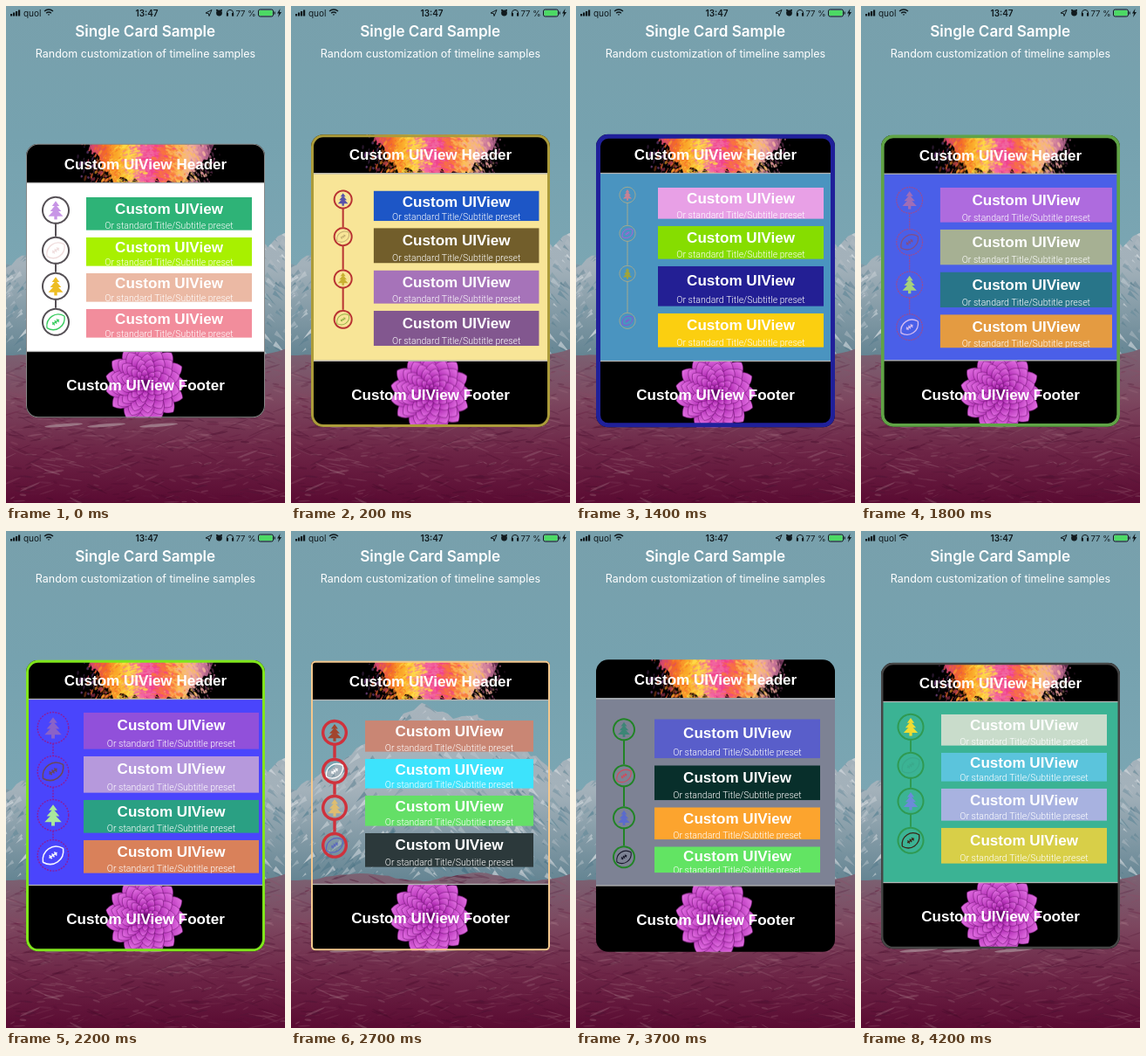
An HTML page with a canvas for the animation above (4.3 s loop, 320 by 569 pixels).

```html
<!DOCTYPE html>
<html lang="en">
<head>
<meta charset="utf-8">
<title>Single Card Sample</title>
<style>
html, body { margin: 0; width: 100%; height: 100%; overflow: hidden; background: #78a1ae; }
canvas { display: block; }
</style>
</head>
<body>
<canvas id="stage" width="320" height="569"></canvas>
<script>
const W = 320, H = 569, LOOP = 4300, TAU = Math.PI * 2;
const CARD = { x: 23, w: 274, head: 44, foot: 75.5, middle: 314.6, gap: 8 };
const UI = 'Inter, Roboto, sans-serif';
const BOLD = 'bold 17.07px "Liberation Sans", Arial, sans-serif';
const LIGHT = '300 10.55px Roboto, "Liberation Sans", sans-serif';
const ctx = document.getElementById('stage').getContext('2d');

let seed = 7;
const rnd = (a = 0, b = 1) => {
  seed = (seed * 16807) % 2147483647;
  return a + (b - a) * seed / 2147483647;
};
const pick = list => list[Math.floor(rnd(0, list.length))];

function layer(w, h, draw) {
  const c = document.createElement('canvas');
  c.width = w;
  c.height = h;
  draw(c.getContext('2d'));
  return c;
}

function stops(fill, ...colors) {
  colors.forEach((c, i) => fill.addColorStop(i / (colors.length - 1), c));
  return fill;
}

function poly(g, ...pts) {
  g.beginPath();
  for (const [x, y] of pts) g.lineTo(x, y);
  g.closePath();
}

function text(g, str, x, y, font, color = '#fff', align = 'center') {
  g.font = font;
  g.fillStyle = color;
  g.textAlign = align;
  g.fillText(str, x, y);
}

function statusBar(g) {
  const ink = '#10191d';
  g.fillStyle = g.strokeStyle = ink;
  for (let i = 0; i < 4; i++) g.fillRect(5 + i * 3, 9 - i * 1.5, 2.2, 2.5 + i * 1.5);
  g.lineWidth = 1.5;
  for (const r of [1, 4, 7]) {
    g.beginPath();
    g.arc(49, 11, r, -Math.PI * .75, -Math.PI * .25);
    g.stroke();
  }
  text(g, 'quol', 20, 11.5, '10px ' + UI, ink, 'left');
  text(g, '13:47', 161.5, 11.5, '600 10px ' + UI, ink);
  text(g, '77 %', 286.5, 11.5, '9.5px ' + UI, ink, 'right');
  g.lineWidth = 1;
  poly(g, [229, 8], [236, 4.5], [233, 11.5], [232.3, 8.6]);
  g.stroke();
  g.beginPath();
  g.arc(244.5, 8, 3.4, 0, TAU);
  g.fill();
  g.beginPath();
  g.arc(257, 8, 3.6, Math.PI, 0);
  g.stroke();
  for (const x of [241, 246]) g.fillRect(x, 4, 2, 1.5);
  for (const x of [252.8, 259]) g.fillRect(x, 8, 2.2, 3.6);
  g.beginPath();
  g.roundRect(289.5, 4, 17, 8, 2);
  g.stroke();
  g.fillRect(307.5, 6.5, 1.2, 3);
  g.fillStyle = '#4cd964';
  g.fillRect(290.5, 5, 15, 6);
  g.fillStyle = ink;
  poly(g, [314.5, 3], [311, 8.5], [313, 8.5], [312, 13], [316, 7], [313.8, 7]);
  g.fill();
}

// Rough line through a few key points
function ridge(keys, step, jitter) {
  const pts = [];
  keys.slice(1).forEach(([x1, y1], i) => {
    const [x0, y0] = keys[i];
    for (let x = x0; x < x1; x += step) {
      pts.push([x, y0 + (y1 - y0) * (x - x0) / (x1 - x0) + rnd(-jitter, jitter)]);
    }
  });
  return [...pts, keys.at(-1)];
}

const backdrop = layer(W, H, g => {
  g.fillStyle = stops(g.createLinearGradient(0, 0, 0, 300), '#78a0ac', '#76a2af', '#7ba6b3');
  g.fillRect(0, 0, W, H);

  g.save();
  poly(g, ...ridge([[0, 298], [45, 272], [150, 196], [190, 215], [215, 211], [300, 274], [320, 260]], 6, 3),
    [W, 410], [0, 410]);
  g.fillStyle = stops(g.createLinearGradient(0, 195, 0, 400), '#a7b3bc', '#a3b1ba', '#658593');
  g.fill();
  g.clip();
  for (let i = 0; i < 850; i++) {
    const x = rnd(-10, 330), y = rnd(195, 392), s = rnd(2, 11), lean = x < 155 ? -s : s;
    g.globalAlpha = rnd(.25, .65);
    g.fillStyle = pick(['#dfe3e6', '#c8cfd5', '#aeb9c1', '#4a7385', '#5f8797']);
    poly(g, [x, y], [x + lean, y + s * 1.3], [x + lean * .3, y + s * .8], [x - lean * .3, y + s * .5]);
    g.fill();
  }
  g.restore();

  g.save();
  const edge = Array.from({ length: 41 }, (_, i) => [i * 8, 396 + 4 * Math.sin(i * .38 + 1) + rnd(-1.5, 1.5)]);
  poly(g, ...edge, [W, H], [0, H]);
  g.fillStyle = stops(g.createLinearGradient(0, 390, 0, H), '#7b6474', '#7d4860', '#6d2546', '#5a0b32');
  g.fill();
  g.clip();
  for (let i = 0; i < 900; i++) {
    g.globalAlpha = rnd(.12, .4);
    g.fillStyle = pick(['#a0707f', '#8b4d65', '#4f1535', '#611a3d', '#420a28']);
    g.beginPath();
    g.ellipse(rnd(0, W), rnd(395, H), rnd(2, 14), rnd(.4, 1.3), rnd(-.5, .5), 0, TAU);
    g.fill();
  }
  g.globalAlpha = .7;
  g.fillStyle = '#ab919b';
  for (const x of [66, 115, 175]) {
    g.beginPath();
    g.ellipse(x, 480, 22, 1.8, -.08, 0, TAU);
    g.fill();
  }
  g.restore();

  statusBar(g);
  text(g, 'Single Card Sample', 159.7, 35, '600 17.1px ' + UI);
  text(g, 'Random customization of timeline samples', 160, 58.5, '12.5px ' + UI);
});

// Burst of coloured powder
const header = layer(CARD.w, CARD.head, g => {
  g.fillRect(0, 0, CARD.w, CARD.head);
  const dust = ['#6c3f78', '#d8486c', '#f46a2a', '#fba92a', '#ffdc48', '#f26aa4', '#f2428c',
    '#f9763e', '#fcc058', '#f3b09c', '#c9759a', '#5c2a4a'];
  const last = dust.length - 1;
  g.fillStyle = stops(g.createLinearGradient(62, 0, 218, 0), ...dust);
  poly(g, ...ridge([[72, 0], [100, 40], [135, 44], [180, 42], [212, 10], [216, 0]], 4, 5));
  g.fill();
  for (let i = 0; i < 1400; i++) {
    const u = (rnd() + rnd()) / 2, band = Math.round(u * last + rnd(-1.1, 1.1));
    g.globalAlpha = rnd(.35, .9);
    g.fillStyle = dust[Math.max(0, Math.min(last, band))];
    g.beginPath();
    g.ellipse(58 + u * 165, rnd(-2, 46), rnd(.5, 3.6), rnd(.4, 1.6), (.5 - u) * -3, 0, TAU);
    g.fill();
  }
});

// Dahlia
const footer = layer(CARD.w, 76, g => {
  g.fillRect(0, 0, CARD.w, 76);
  g.translate(137, 36);
  g.strokeStyle = 'rgba(95, 8, 100, .55)';
  g.lineWidth = .8;
  for (let ring = 0; ring < 7; ring++) {
    const r = 46 - ring * 6, n = 15 - ring, half = r * .3;
    g.fillStyle = stops(g.createRadialGradient(0, 0, r * .3, 0, 0, r), '#6c0f70', '#b32fb6', '#e472e4');
    for (let i = 0; i < n; i++) {
      g.save();
      g.rotate((i + ring * .5 + rnd(-.12, .12)) / n * TAU);
      g.beginPath();
      g.moveTo(0, 0);
      g.bezierCurveTo(r * .5, -half, r * .85, -half, r, 0);
      g.bezierCurveTo(r * .85, half, r * .5, half, 0, 0);
      g.fill();
      g.stroke();
      g.restore();
    }
  }
});

// Moments of change; each style is reached at its own step
const changes = [0, 100, 200, 700, 900, 1100, 1200, 1400, 1700, 1800, 2200, 2600, 2700, 3200, 3700, 4200];

// x: left edge of the cells, pad: space above and below them, r: circle radius
const styles = [
  { step: 0, x: 92, pad: [17, 16], heights: [38, 33, 33, 33], r: 16, border: 1,
    edge: '#888888', body: '#ffffff', stroke: '#555055',
    cells: ['#2eb377', '#a8f000', '#ebb9a4', '#f28d9c'], icons: ['#c795e6', '#f0dddd', '#edbd22', '#38cc5e'] },
  { step: 3, x: 96, pad: [22, 18], heights: [33, 44, 41, 44], r: 8.5, border: 4,
    edge: '#bda513', body: '#f5d863', stroke: '#ea2420',
    cells: ['#1428ee', '#571540', '#8450c4', '#4a3c88'], icons: ['#22328c', '#ad9638', '#b6aa38', '#c7a63c'] },
  { step: 7, x: 94, pad: [17, 16], heights: [36, 38, 46, 39], r: 9.5, border: 5, line: 1,
    edge: '#20209a', body: '#4a94c0', stroke: '#a9ab8c',
    cells: ['#e8a0e6', '#86dd00', '#231f94', '#fbcf10'], icons: ['#c88294', '#b759da', '#a0a43a', '#9548d4'] },
  { step: 10, x: 89, pad: [16, 14], heights: [42, 42, 38, 38], r: 18.5, border: 3, line: 1.4, dots: 1.3, width: 201,
    edge: '#80e51c', body: '#4a45fc', stroke: '#8b1c9c',
    cells: ['#9150da', '#b699dc', '#2aa083', '#d9815a'], icons: ['#8a62c8', '#6a4856', '#a9e89c', '#f6f6ff'] },
  { step: 12, x: 85, pad: [24, 20], heights: [36, 34, 35, 39], r: 15, border: 2, line: 3.4, width: 193, radius: 5,
    edge: '#f4c88e', body: '#9aa4aa00', stroke: '#cf323c',
    cells: ['#c98674', '#3de3fc', '#64df67', '#2c393b'], icons: ['#a2452e', '#ffffff', '#dfbd70', '#5c69be'] },
  { step: 14, x: 90, pad: [24, 15], heights: [45, 40, 37, 30], r: 13, border: 0,
    edge: '#7d829400', body: '#7d8294', stroke: '#218426',
    cells: ['#595eca', '#082f2b', '#fca42e', '#62e463'], icons: ['#3c8676', '#d24a5c', '#5b6bcd', '#18192b'] },
  { step: 15, x: 92, pad: [15, 22], heights: [36, 33, 37, 41], r: 15.5, border: 2.5,
    edge: '#454545', body: '#3bb394', stroke: '#2f9a52',
    cells: ['#c9dccb', '#5bc4dc', '#a8b2e0', '#d8cf48'], icons: ['#f0dc32', '#3aa98c', '#6c8bd8', '#3a2414'] }
].map(s => ({ line: 2, dots: 0, width: 190, radius: 14, ...s }));

const channels = c => (c + 'ff').slice(1, 9).match(/../g).map(v => parseInt(v, 16));

function mix(a, b, k) {
  if (typeof a === 'number') return a + (b - a) * k;
  if (typeof a === 'string') {
    const [r, g, bl, al] = mix(channels(a), channels(b), k);
    return `rgba(${r}, ${g}, ${bl}, ${al / 255})`;
  }
  if (Array.isArray(a)) return a.map((v, i) => mix(v, b[i], k));
  return Object.fromEntries(Object.keys(a).map(key => [key, mix(a[key], b[key], k)]));
}

function styleAt(t) {
  const step = changes.findLastIndex(start => start <= t);
  const a = styles.findLast(s => s.step <= step), b = styles.find(s => s.step > step) || a;
  return mix(a, b, (step - a.step) / (b.step - a.step || 1));
}

function tree() {
  for (let i = 0; i < 3; i++) {
    const y = -1 + i * .4, half = .4 + i * .2;
    poly(ctx, [0, y], [half, y + .55 + i * .15], [-half, y + .55 + i * .15]);
    ctx.fill();
  }
  ctx.fillRect(-.16, .6, .32, .4);
}

function ball() {
  ctx.rotate(-.6);
  ctx.lineWidth = .13;
  ctx.beginPath();
  for (const side of [-1, 1]) {
    ctx.moveTo(-1.15, 0);
    ctx.bezierCurveTo(-.65, side, .65, side, 1.15, 0);
  }
  ctx.moveTo(-.45, 0);
  ctx.lineTo(.45, 0);
  for (const x of [-.28, 0, .28]) {
    ctx.moveTo(x, -.2);
    ctx.lineTo(x, .2);
  }
  ctx.stroke();
}

function drawCell(s, i, y, nextY) {
  const h = s.heights[i], cx = s.x - 35, cy = y + s.r - 1, mid = s.x + s.width / 2, r = s.r - s.line / 2;
  ctx.save();
  ctx.beginPath();
  ctx.rect(s.x, y, s.width, h);
  ctx.clip();
  ctx.fillStyle = s.cells[i];
  ctx.fillRect(s.x, y, s.width, h);
  text(ctx, 'Custom UIView', mid, y + h / 3 + 6.6, BOLD);
  text(ctx, 'Or standard Title/Subtitle preset', mid, y + h * .75 + 7.8, LIGHT);
  ctx.restore();

  ctx.save();
  ctx.strokeStyle = s.stroke;
  ctx.lineWidth = s.line;
  ctx.setLineDash([2, s.dots]);
  ctx.beginPath();
  ctx.arc(cx, cy, r, 0, TAU);
  if (nextY) {
    ctx.moveTo(cx, cy + r);
    ctx.lineTo(cx, nextY - 1);
  }
  ctx.stroke();
  ctx.setLineDash([]);
  ctx.translate(cx, cy);
  ctx.scale(s.r * .66, s.r * .66);
  ctx.fillStyle = ctx.strokeStyle = s.icons[i];
  (i % 2 ? ball : tree)();
  ctx.restore();
}

function drawCard(s) {
  const { x, w, head, foot, middle, gap } = CARD;
  const cells = s.heights.reduce((sum, h) => sum + h + gap, -gap);
  const body = s.pad[0] + cells + s.pad[1], height = head + body + foot;
  const top = middle - height / 2, footY = top + head + body;

  ctx.save();
  ctx.beginPath();
  ctx.roundRect(x, top, w, height, s.radius);
  ctx.clip();
  ctx.fillStyle = s.body;
  ctx.fillRect(x, top + head, w, body);
  ctx.drawImage(header, x, top);
  ctx.drawImage(footer, x, footY);
  ctx.fillStyle = '#b4b4b4';
  for (const y of [top + head, footY - 1]) ctx.fillRect(x, y, w, 1.3);
  ctx.strokeStyle = s.edge;
  ctx.lineWidth = s.border * 2;
  ctx.beginPath();
  ctx.roundRect(x, top, w, height, s.radius);
  ctx.stroke();
  ctx.restore();

  text(ctx, 'Custom UIView Header', 160, top + 29, BOLD);
  text(ctx, 'Custom UIView Footer', 160, footY + 44.5, BOLD);

  let y = top + head + s.pad[0];
  s.heights.forEach((h, i) => {
    const next = y + h + gap;
    drawCell(s, i, y, i < 3 && next);
    y = next;
  });
}

function frame() {
  ctx.drawImage(backdrop, 0, 0);
  drawCard(styleAt(performance.now() % LOOP));
  requestAnimationFrame(frame);
}
frame();
</script>
</body>
</html>
```
